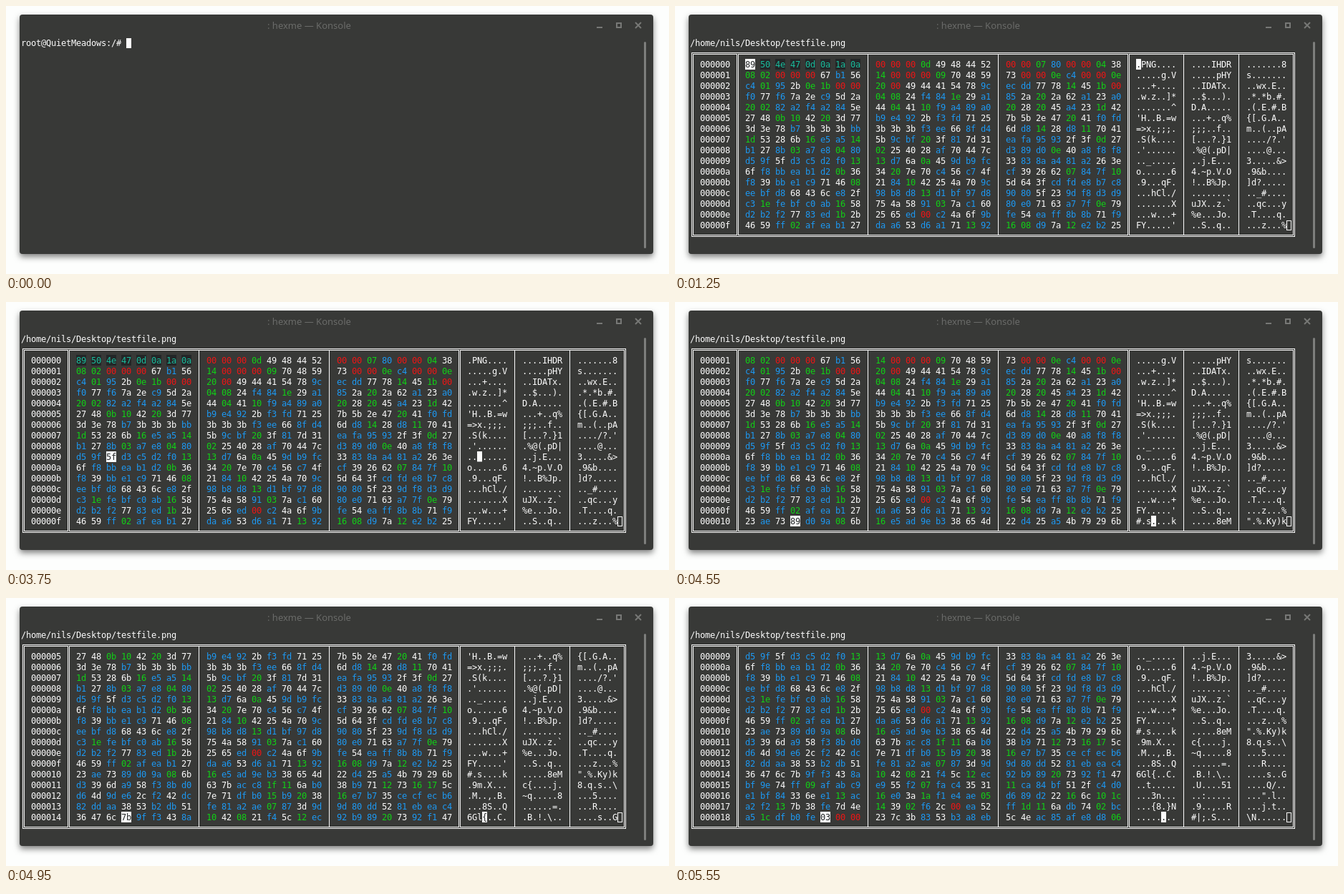
These frames come from a looping animation (926 px wide and 375 px high, 8550 ms). An HTML page with a canvas:

```html
<!DOCTYPE html>
<html lang="en">
<head>
<meta charset="utf-8">
<title>hexme</title>
<style>
html, body { margin: 0; width: 100%; height: 100%; overflow: hidden; background: #fdfefd; }
canvas { display: block; }
</style>
</head>
<body>
<canvas id="stage" width="926" height="375"></canvas>
<script>
const LOOP = 8550, TYPED = 800, OPENED = 1250, FIRST_MOVE = 2750, STEP = 100;
const CELL_W = 7, CELL_H = 15, LEFT = 21, TOP = 44, VISIBLE = 16;
const WINDOW = '#383937', WHITE = '#fcfcfc', DARK = '#232627', DIM = '#6a6b69';
const BLUE = '#1d99f3', GREEN = '#11d116', RED = '#ed1515', TEAL = '#1abc9c';
const PROMPT = 'root@QuietMeadows:/# ';
const PATH = '/home/nils/Desktop/testfile.png';
const COMMAND = `hexme ${PATH} `;
const MOVES = 'D'.repeat(9) + 'RRR' + 'D'.repeat(15) + 'RR';
const HEX_COLS = [11, 37, 63], ASCII_COLS = [89, 100, 111];

const rows = `
89 50 4e 47 0d 0a 1a 0a 00 00 00 0d 49 48 44 52 00 00 07 80 00 00 04 38
08 02 00 00 00 67 b1 56 14 00 00 00 09 70 48 59 73 00 00 0e c4 00 00 0e
c4 01 95 2b 0e 1b 00 00 20 00 49 44 41 54 78 9c ec dd 77 78 14 45 1b 00
f0 77 f6 7a 2e c9 5d 2a 04 08 24 f4 84 1e 29 a1 85 2a 20 2a 62 a1 23 a0
20 02 82 a2 f4 a2 84 5e 44 04 41 10 f9 a4 89 a0 20 28 20 45 a4 23 1d 42
27 48 0b 10 42 20 3d 77 b9 e4 92 2b f3 fd 71 25 7b 5b 2e 47 20 41 f0 fd
3d 3e 78 b7 3b 3b 3b bb 3b 3b 3b f3 ee 66 8f d4 6d d8 14 28 d8 11 70 41
1d 53 28 6b 16 e5 a5 14 5b 9c bf 20 3f 81 7d 31 ea fa 95 93 2f 3f 0d 27
b1 27 8b 03 a7 e8 04 80 02 25 40 28 af 70 44 7c d3 89 d0 0e 40 a8 f8 f8
d5 9f 5f d3 c5 d2 f0 13 13 d7 6a 0a 45 9d b9 fc 33 83 8a a4 81 a2 26 3e
6f f8 bb ea b1 d2 0b 36 34 20 7e 70 c4 56 c7 4f cf 39 26 62 07 84 7f 10
f8 39 bb e1 c9 71 46 08 21 84 10 42 25 4a 70 9c 5d 64 3f cd fd e8 b7 c8
ee bf d8 68 43 6c e8 2f 98 b8 d8 13 d1 bf 97 d8 90 80 5f 23 9d f8 d3 d9
c3 1e fe bf c0 ab 16 58 75 4a 58 91 03 7a c1 60 80 e0 71 63 a7 7f 0e 79
d2 b2 f2 77 83 ed 1b 2b 25 65 ed 00 c2 4a 6f 9b fe 54 ea ff 8b 8b 71 f9
46 59 ff 02 af ea b1 27 da a6 53 d6 a1 71 13 92 16 08 d9 7a 12 e2 b2 25
23 ae 73 89 d0 9a 08 6b 16 e5 ad 9e b3 38 65 4d 22 d4 25 a5 4b 79 29 6b
d3 39 6d a9 58 f3 8b d0 63 7b ac c8 1f 11 6a b0 38 b9 71 12 73 16 17 5c
d6 4d 9d e6 2c f2 42 dc 7e 71 df b0 15 b9 20 38 16 e7 b7 35 ce cf ec b6
82 dd aa 38 53 b2 db 51 fe 81 a2 ae 07 87 3d 9d 9d 80 dd 52 81 eb ea c4
36 47 6c 7b 9f f3 43 8a 10 42 08 21 f4 5c 12 ec 92 b9 89 20 73 92 f1 47
bf 9e 74 ff 09 af ab c9 e9 55 f2 07 fa c4 35 31 11 ca 84 bf 51 2f c4 d0
e1 bf 84 33 6e e1 13 ac 16 e0 3a 1a f1 e4 ae 05 d6 89 d2 22 16 6c 10 1c
a2 f2 13 7b 38 fe 7d 4e 14 39 02 f6 2c 00 ea 52 ff 1d 11 6a db 74 02 bc
a5 1c df b0 fe 03 00 00 23 7c 3b 83 53 b3 a8 eb 5c 4e ac 85 af e8 d8 06
`.trim().split('\n').map(line => line.split(' '));

const ctx = document.getElementById('stage').getContext('2d');

function box(x, y, w, h, color) {
  ctx.fillStyle = color;
  ctx.fillRect(x, y, w, h);
}

function outline(left, top, right, bottom) {
  ctx.strokeRect(left + 0.5, top + 0.5, right - left, bottom - top);
}

// Terminal text: one glyph per grid cell, with an optional background.
function print(text, col, line, color = WHITE, back) {
  const x = LEFT + col * CELL_W, y = TOP + line * CELL_H;
  if (back) box(x, y, text.length * CELL_W, CELL_H, back);
  ctx.font = '12px "DejaVu Sans Mono", monospace';
  ctx.fillStyle = color;
  [...text].forEach((ch, i) => ctx.fillText(ch, x + i * CELL_W, y + 12));
}

function drawWindow() {
  box(0, 0, 926, 375, '#fdfefd');
  ctx.save();
  ctx.shadowColor = 'rgba(0,0,0,.5)';
  ctx.shadowBlur = 9;
  ctx.shadowOffsetY = 4;
  ctx.fillStyle = WINDOW;
  ctx.beginPath();
  ctx.roundRect(19, 12, 885, 335, 4);
  ctx.fill();
  ctx.restore();

  ctx.font = '13px "Noto Sans", sans-serif';
  ctx.fillStyle = DIM;
  ctx.fillText(': hexme — Konsole', 365, 32);

  box(825, 29, 8, 2, '#777876');
  ctx.strokeStyle = '#777876';
  ctx.lineWidth = 2;
  ctx.strokeRect(853, 24, 6, 6);
  ctx.beginPath();
  ctx.moveTo(879, 23); ctx.lineTo(887, 31);
  ctx.moveTo(887, 23); ctx.lineTo(879, 31);
  ctx.stroke();

  ctx.fillStyle = '#7d7e7c';
  ctx.beginPath();
  ctx.roundRect(891, 50, 3, 289, 1.5);
  ctx.fill();
}

function drawShell(typed) {
  const line = PROMPT + (typed ? COMMAND : '');
  print(line, 0, 0);
  box(LEFT + line.length * CELL_W, TOP + 1, CELL_W, CELL_H - 1, WHITE);
}

function drawFrame() {
  ctx.strokeStyle = WHITE;
  ctx.lineWidth = 1;
  outline(23, 65, 865, 322);
  for (const [left, right] of [[25, 86], [88, 632], [634, 863]]) outline(left, 67, right, 320);
  for (const x of [269, 451, 710, 787]) box(x, 67, 1, 254, WHITE);
  outline(854, 300, 860, 313);
}

function byteColor(value) {
  if (value === 0) return RED;
  if (value <= 32) return GREEN;
  return value < 127 ? WHITE : BLUE;
}

function drawHex(cursorRow, cursorCol) {
  print(PATH, 0, 0);
  drawFrame();
  const first = Math.max(0, cursorRow - VISIBLE + 1);
  for (let i = 0; i < VISIBLE; i++) {
    const row = first + i, line = i + 2;
    print(row.toString(16).padStart(6, '0'), 2, line);
    rows[row].forEach((hex, col) => {
      const value = parseInt(hex, 16), group = col >> 3, slot = col & 7;
      const char = value > 32 && value < 127 ? String.fromCharCode(value) : '.';
      const selected = row === cursorRow && col === cursorCol;
      const signature = row === 0 && col < 8;
      const style = selected ? [DARK, WHITE]
        : signature ? [TEAL, DARK] : [byteColor(value)];
      print(hex, HEX_COLS[group] + slot * 3, line, ...style);
      print(char, ASCII_COLS[group] + slot, line, ...(selected ? style : []));
    });
  }
}

function draw() {
  const t = performance.now() % LOOP;
  drawWindow();
  if (t < OPENED) {
    drawShell(t >= TYPED);
  } else {
    const count = Math.max(0, Math.floor((t - FIRST_MOVE) / STEP) + 1);
    const done = [...MOVES.slice(0, count)];
    const right = done.filter(move => move === 'R').length;
    drawHex(done.length - right, right);
  }
  requestAnimationFrame(draw);
}
draw();
</script>
</body>
</html>
```
